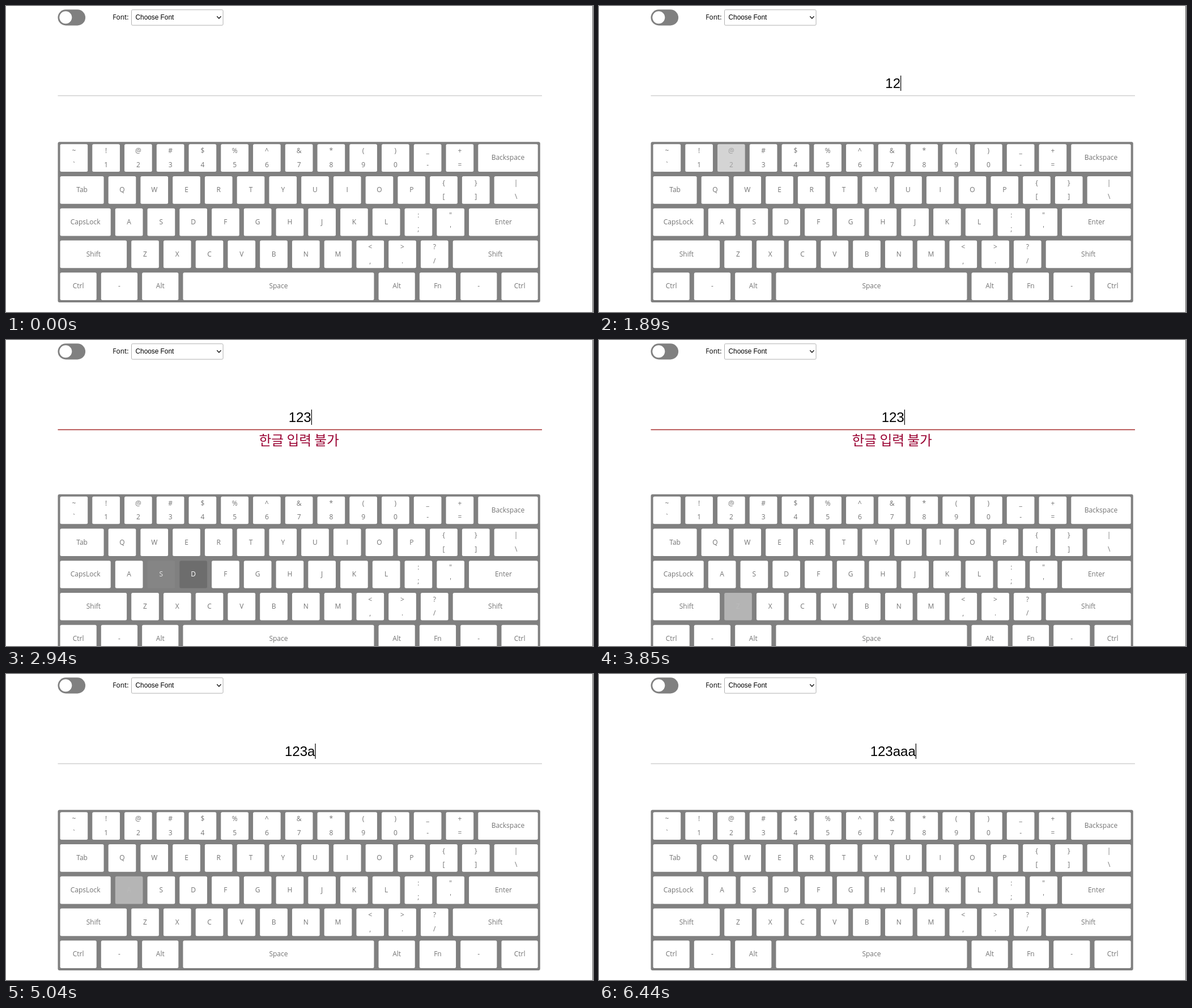
An HTML page with a canvas that plays this animation: 1036 by 541 pixels, repeating every 6.65 s.

```html
<!DOCTYPE html>
<html lang="ko">
<head>
<meta charset="utf-8">
<title>Virtual keyboard</title>
<style>
  html, body { margin: 0; width: 100%; height: 100%; overflow: hidden; background: #fff; }
  canvas { display: block; }
</style>
</head>
<body>
<canvas id="stage" width="1036" height="541"></canvas>
<script>
const ctx = document.getElementById('stage').getContext('2d');
const LOOP = 6650, STEP = 70;
const UNIT = 0.8107;            // layout pixels to stage pixels
const LEFT = 91.5, TOP = 240.2, MID = 518.7;
const GRAY = 0x80, INK = 0x74, DARK = 0x6d;
const FADE = 100;

const UI = '"Open Sans", "Noto Sans", sans-serif';
const ARIAL = '"Liberation Sans", Arial, sans-serif';
const HANGUL = '"Noto Sans CJK KR", "Noto Sans CJK", sans-serif';

// A two-character label is drawn as upper and lower symbol.
const ROWS = [
  ['~` !1 @2 #3 $4 %5 ^6 &7 *8 (9 )0 _- += Backspace', { Backspace: 130 }],
  ['Tab Q W E R T Y U I O P {[ }] |\\', { Tab: 95, '|\\': 95 }],
  ['CapsLock A S D F G H J K L :; "\' Enter', { CapsLock: 110, Enter: 150 }],
  ['Shift Z X C V B N M <, >. ?/ Shift', { Shift: 145 }],
  ['Ctrl - Alt Space Alt Fn - Ctrl', { Ctrl: 79.18, '-': 79.18, Alt: 79.18, Fn: 79.18, Space: 415.7 }]
];

const keys = [];
ROWS.forEach(([text, widths], row) => {
  const labels = text.split(' ');
  let x = 5;
  labels.forEach((label, i) => {
    const last = i === labels.length - 1;
    const w = last ? 1045 - x : widths[label] || 60;
    keys.push({ label, x: LEFT + x * UNIT, y: TOP + (5 + row * 70) * UNIT, w: w * UNIT, h: 60 * UNIT });
    x += w + 10;
  });
});

// key, time down, time up, text typed
const PRESSES = [
  ['!1', 1650, 1780, '1'], ['@2', 1870, 1990, '2'], ['#3', 2080, 2200, '3'],
  ['A', 2490, 2630, ''], ['S', 2670, 2926, ''], ['D', 2830, 2950, ''],
  ['Z', 3820, 3940, ''],
  ['A', 4870, 5011, 'a'], ['A', 5090, 5210, 'a'], ['A', 5300, 5420, 'a']
];
const ERROR = [2520, 4620];
const CARET = [[1190, 3360], [3850, 4340], [4900, 5880], [6370, LOOP]];

const gray = v => `rgb(${v},${v},${v})`;
const mix = (a, b, p) => a + (b - a) * p;
const clamp = v => Math.max(0, Math.min(1, v));
const within = (t, [a, b]) => t >= a && t < b;

// CSS "ease" curve
function ease(x) {
  let lo = 0, hi = 1, u = x;
  for (let i = 0; i < 20; i++) {
    u = (lo + hi) / 2;
    const bx = 3 * (1 - u) ** 2 * u * 0.25 + 3 * (1 - u) * u * u * 0.25 + u ** 3;
    if (bx < x) lo = u; else hi = u;
  }
  return 3 * (1 - u) ** 2 * u * 0.1 + 3 * (1 - u) * u * u + u ** 3;
}

function pressLevel(label, t) {
  return PRESSES.reduce((level, [key, down, up]) => key === label
    ? Math.max(level, ease(clamp((t - down) / FADE)) - ease(clamp((t - up) / FADE)))
    : level, 0);
}

function box(x, y, w, h, r, fill) {
  ctx.fillStyle = fill;
  ctx.beginPath();
  ctx.roundRect(x, y, w, h, r);
  ctx.fill();
}

function write(text, x, y, font, color, align = 'left') {
  ctx.font = font;
  ctx.fillStyle = color;
  ctx.textAlign = align;
  ctx.fillText(text, x, y);
}

function drawHeader() {
  box(91.5, 6.3, 48.6, 28.2, 14.1, gray(GRAY));
  box(94.3, 9.3, 22, 22, 11, '#fff');
  write('Font:', 188.3, 24, `12px ${UI}`, '#000');

  ctx.strokeStyle = '#b2b2b2';
  ctx.lineWidth = 1;
  ctx.beginPath();
  ctx.roundRect(221.5, 6.7, 161.6, 27.4, 2);
  ctx.stroke();
  write('Choose Font', 228.5, 24.2, `11.85px ${ARIAL}`, '#000');

  ctx.strokeStyle = '#111';
  ctx.lineWidth = 1.4;
  ctx.beginPath();
  ctx.moveTo(372.3, 18.2);
  ctx.lineTo(375.9, 21.9);
  ctx.lineTo(379.5, 18.2);
  ctx.stroke();
}

function drawInput(t, error) {
  const text = PRESSES.filter(p => t >= p[1]).map(p => p[3]).join('');
  ctx.font = `24px ${ARIAL}`;
  const half = ctx.measureText(text).width / 2;
  write(text, MID - half, 144.8, ctx.font, '#000');
  if (CARET.some(span => within(t, span))) {
    ctx.fillStyle = '#000';
    ctx.fillRect(MID + half, 123, 1.2, 27);
  }
  ctx.fillStyle = error ? '#a52a2a' : '#d0d0d0';
  ctx.fillRect(LEFT, 157.8, 854.5, 1.5);
  if (error) write('한글 입력 불가', 517.2, 186, `23.7px ${HANGUL}`, '#9a0233', 'center');
}

function drawKeyboard(t) {
  box(LEFT, TOP, 1050 * UNIT, 350 * UNIT, 3, gray(GRAY));
  for (const { label, x, y, w, h } of keys) {
    const p = pressLevel(label, t);
    const color = gray(mix(INK, 255, p)), font = `12px ${UI}`;
    const cx = x + w / 2, base = y + h / 2 + 3.8;
    box(x, y, w, h, 2.5, gray(mix(255, DARK, p)));
    if (label.length === 2 && label !== 'Fn') {
      write(label[0], cx, base - h / 4, font, color, 'center');
      write(label[1], cx, base + h / 4, font, color, 'center');
    } else {
      write(label, cx, base, font, color, 'center');
    }
  }
}

function curve(p, a, b, c) {
  const q = 1 - p;
  return [0, 1].map(i => q * q * a[i] + 2 * q * p * b[i] + p * p * c[i]);
}

function pointerAt(t) {
  if (within(t, [70, 700])) return curve((t - 70) / 630, [530, 526], [480, 190], [416, 120]);
  if (within(t, [700, 1650])) {
    const p = clamp((t - 700) / 140), q = clamp((t - 980) / 280);
    return [mix(mix(416, 437, p), 445, q), mix(mix(120, 143, p), 136.5, q)];
  }
  if (within(t, [5670, 6440])) return curve((t - 5670) / 730, [464, 140], [660, 330], [526, 540]);
  return null;
}

function drawIBeam() {
  ctx.beginPath();
  ctx.moveTo(-3.2, -7.6);
  ctx.quadraticCurveTo(0, -7.4, 0, -5);
  ctx.lineTo(0, 5);
  ctx.quadraticCurveTo(0, 7.4, -3.2, 7.6);
  ctx.moveTo(3.2, -7.6);
  ctx.quadraticCurveTo(0, -7.4, 0, -5);
  ctx.moveTo(0, 5);
  ctx.quadraticCurveTo(0, 7.4, 3.2, 7.6);
  ctx.moveTo(-1.8, 2.5);
  ctx.lineTo(1.8, 2.5);
  ctx.strokeStyle = '#111';
  ctx.lineWidth = 1.3;
  ctx.stroke();
}

function drawArrow() {
  const points = [[0, 0], [0, 13.5], [3, 10.7], [5, 15.3], [7.2, 14.3], [5.2, 9.8], [9.4, 9.6]];
  ctx.beginPath();
  points.forEach(([x, y]) => ctx.lineTo(x, y));
  ctx.closePath();
  ctx.strokeStyle = '#fff';
  ctx.lineWidth = 2;
  ctx.stroke();
  ctx.fillStyle = '#000';
  ctx.fill();
}

function drawPointer(t) {
  const at = pointerAt(t);
  if (!at) return;
  ctx.save();
  ctx.translate(...at);
  if (at[1] > 112 && at[1] < 158) drawIBeam(); else drawArrow();
  ctx.restore();
}

function draw(t) {
  const error = within(t, ERROR);
  ctx.fillStyle = '#fff';
  ctx.fillRect(0, 0, 1036, 541);
  drawHeader();
  drawInput(t, error);
  ctx.save();
  ctx.translate(0, error ? 40 * UNIT : 0);
  drawKeyboard(t);
  ctx.restore();
  drawPointer(t);
  ctx.fillStyle = '#5c5c5c';
  ctx.fillRect(1035, 0, 1, 541);
}

const start = performance.now();
function frame() {
  const t = (performance.now() - start) % LOOP;
  draw(Math.floor(t / STEP) * STEP);
  requestAnimationFrame(frame);
}
frame();
</script>
</body>
</html>
```
